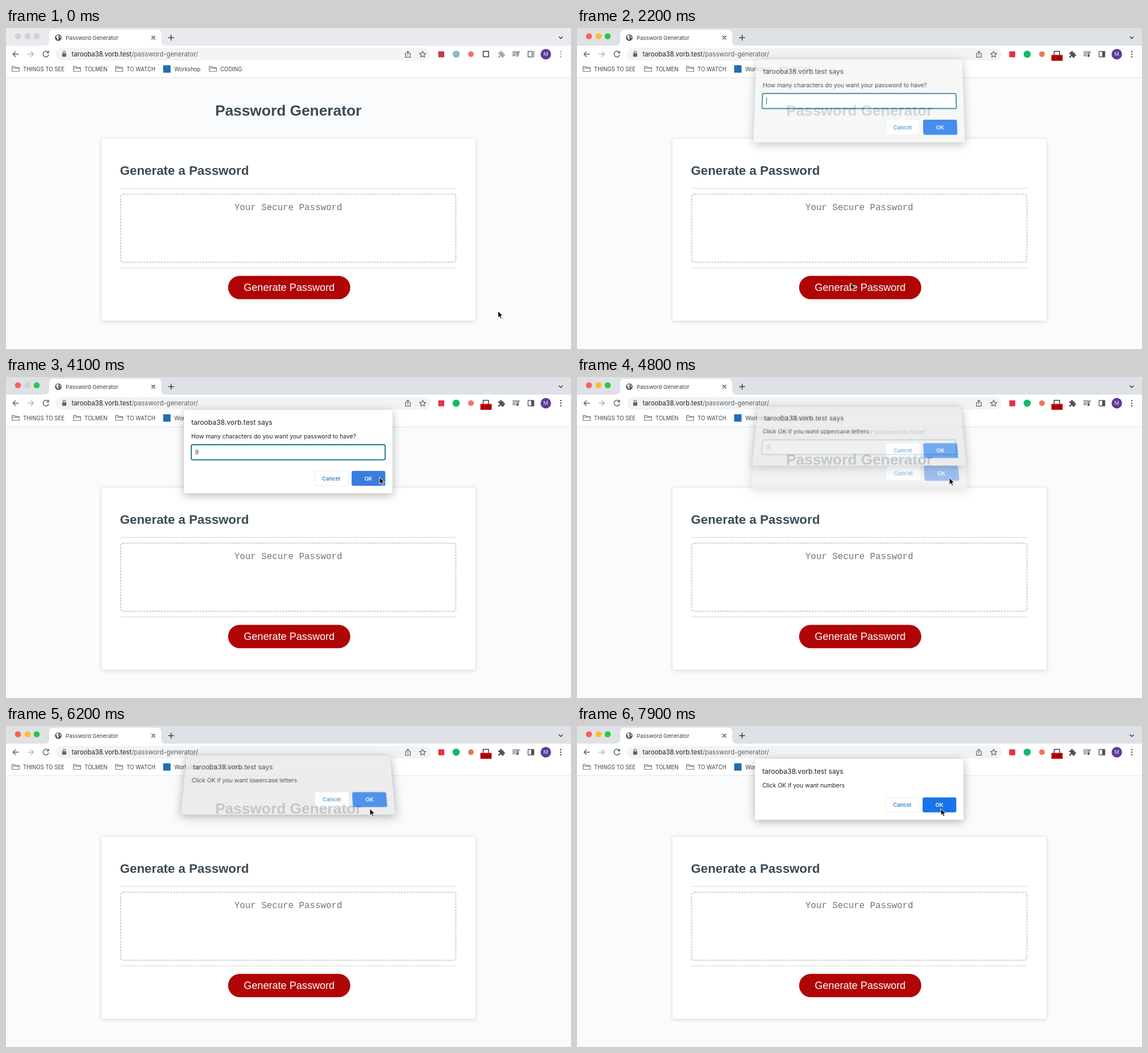
Recreate the animation shown at these times as an HTML page. Size 994 by 564 pixels, loop 8000 ms.

```html
<!DOCTYPE html>
<html lang="en">
<head>
<meta charset="utf-8">
<title>Password Generator</title>
<style>
  html, body { margin: 0; width: 100%; height: 100%; overflow: hidden; background: #fafbfd; }
  svg { position: absolute; left: 0; top: 0; display: block; overflow: visible; }
  text { white-space: pre; }
  .ui { font-family: Inter, Roboto, sans-serif; fill: #3c4043; }
  .page { font-family: "Liberation Sans", Arial, sans-serif; }
  .head { font-weight: 700; fill: #3b4a54; }
  .mono { font-family: "Liberation Mono", monospace; fill: #757575; }
  .line { fill: none; stroke-width: 1.5; stroke-linecap: round; stroke-linejoin: round; }
  .card { filter: drop-shadow(0 1px 3px rgba(0,0,0,.17)); }
  .panel { filter: drop-shadow(0 3px 8px rgba(0,0,0,.3)); }
  .dialog { visibility: hidden; transform-origin: 50% 50%; }
</style>
</head>
<body>
<svg id="stage" width="994" height="564" viewBox="0 0 994 564"></svg>
<div id="dialogs"></div>
<svg id="top" width="994" height="564" viewBox="0 0 994 564">
  <path id="cursor" d="M0 0V12.2L2.8 9.7L4.8 14L6.9 13.1L5 8.9H8.8Z" fill="#111" stroke="#fff" stroke-width="1" stroke-linejoin="round"/>
</svg>
<script>
const LOOP = 8000, STEP = 100;
const HOST = "tarooba38.vorb.test";
const $ = id => document.getElementById(id);

const text = (x, y, size, str, cls = "ui", more = "") =>
  `<text x="${x}" y="${y}" font-size="${size}" class="${cls}" ${more}>${str}</text>`;
const rect = (x, y, w, h, fill, r = 0, more = "") =>
  `<rect x="${x}" y="${y}" width="${w}" height="${h}" rx="${r}" fill="${fill}" ${more}/>`;
const circle = (x, y, r, fill, more = "") =>
  `<circle cx="${x}" cy="${y}" r="${r}" fill="${fill}" ${more}/>`;
const line = (d, more = 'stroke="#5f6368"') => `<path class="line" d="${d}" ${more}/>`;
const middle = 'text-anchor="middle"';

const folder = (x, label) =>
  line(`M${x + .7} 76V67.6H${x + 5}L${x + 6.5} 69.3H${x + 13.3}V76.3H${x + .7}ZM${x + .7} 70.8H${x + 13.3}`,
    'stroke="#6f7377" style="stroke-width:1.1"') + text(x + 20, 75.6, 9.65, label);

function drawStage() {
  const lights = [21, 38, 54].map((x, i) => circle(x, 14.5, 5.3, "#cfd1d4", `id="light${i}"`)).join("");
  const tabStrip =
    rect(0, 0, 994, 31, "#dee1e6", 0, 'id="strip"') + lights +
    `<path d="M68 31Q76 31 76 23V11Q76 3 84 3H265Q273 3 273 11V23Q273 31 281 31Z" fill="#fff"/>` +
    circle(92, 17, 5.8, "#505458") +
    `<path d="M88 14.5L91 12L93 14L91.5 16.5L93 18.5L91 21L89.5 18ZM94 13L96.5 16L95 18Z" fill="#fff"/>` +
    text(105, 20.6, 9.6, "Password Generator") +
    line("M256.5 14.2L262 19.8M262 14.2L256.5 19.8", 'stroke="#3c4043" style="stroke-width:1.3"') +
    line("M286 17H295M290.5 12.5V21.5", 'stroke="#3c4043"') +
    line("M973 15.5L976 18.5L979 15.5", 'stroke="#3c4043"');

  const toolbar =
    rect(0, 31, 994, 56, "#fff") + rect(0, 87, 994, 1, "#dfe1e4") +
    rect(88, 35, 659, 22, "#f1f3f4", 11) +
    line("M22 46H12.5M16.5 41.7L12.2 46L16.5 50.3", 'class="line nav" stroke="#5f6368"') +
    line("M38.5 46H48M44 41.7L48.3 46L44 50.3", 'stroke="#b4b7ba"') +
    line("M74.4 43A5 5 0 1 0 75 47.5M75 40.8V43.8H72", 'class="line nav" stroke="#5f6368"') +
    rect(98.8, 44.5, 7.2, 6, "#5f6368", 1) +
    line("M100.4 44.5V42.8A2 2 0 0 1 104.4 42.8V44.5", 'stroke="#5f6368" style="stroke-width:1.2"') +
    text(115.5, 50, 11.3, `<tspan fill="#202124">${HOST}</tspan><tspan fill="#5f6368">/password-generator/</tspan>`) +
    line("M704.5 44.5H702.8V51.3H711.2V44.5H709.5M707 48V40.8M704.8 42.8L707 40.6L709.2 42.8",
      'stroke="#5f6368" style="stroke-width:1.2"') +
    line("M733 40.7L734.6 44.3L738.5 44.7L735.6 47.3L736.4 51.2L733 49.2L729.6 51.2L730.4 47.3L727.5 44.7L731.4 44.3Z",
      'stroke="#5f6368" style="stroke-width:1.2"') +
    rect(760.5, 41, 10.5, 10.5, "#dc3340", 1, 'id="extA"') +
    circle(792, 46, 6.3, "#15b86a", 'id="extB"') +
    circle(818, 46, 5, "#f2745c") +
    rect(839.5, 41, 9.5, 9.5, "none", 0, 'stroke="#2d3033" stroke-width="1.4"') +
    `<path class="navFill" d="M866 43H869A1.9 1.9 0 1 1 872.5 43H875.5V46A1.8 1.8 0 1 1 875.5 49.4V52H872A1.7 1.7 0 1 0 868.8 52H866V49A1.8 1.8 0 1 0 866 45.8Z"/>` +
    line("M891.5 42.2H900M891.5 45.4H900M891.5 48.6H896M901 48.8V42.2H903.5", 'class="line nav" stroke="#5f6368"') +
    circle(899.7, 49, 1.9, "#5f6368", 'class="navFill"') +
    line("M918.5 41.2H928.5V50.8H918.5Z", 'class="line nav" stroke="#5f6368"') +
    rect(924, 41, 5, 10, "#5f6368", 0, 'class="navFill"') +
    circle(949.7, 46, 9.2, "#5c3a9c") + text(949.7, 49.4, 9.2, "M", "ui", middle + ' style="fill:#ece6f6"') +
    [41.5, 46, 50.5].map(y => circle(976, y, 1.3, "#5f6368", 'class="navFill"')).join("") +
    `<g id="badge">${rect(834.5, 47.3, 20, 10.4, "#c90b0b", 1)}${text(844.6, 55.6, 7.4, "", "ui", middle + ' id="clock" style="fill:#2b0000"')}</g>`;

  const bookmarks =
    folder(10, "THINGS TO SEE") + folder(118, "TOLMEN") + folder(192, "TO WATCH") +
    rect(276.5, 65.5, 13, 13, "#1f6db3") + text(296, 75.6, 9.65, "Workshop") + folder(357, "CODING");

  const page =
    text(496.6, 154.3, 26.32, "Password Generator", "page head", middle) +
    rect(168, 194.5, 658, 320, "#fff", 4, 'class="card"') +
    text(200.5, 258.3, 22.3, "Generate a Password", "page head") +
    rect(201, 281.2, 591, 1.2, "#dcdcdc") + rect(201, 420.9, 591, 1.2, "#dcdcdc") +
    rect(201.8, 292, 589.6, 119.6, "none", 4, 'stroke="#c4c4c4" stroke-width="1.6" stroke-dasharray="3.3 1.9"') +
    text(496.6, 319.6, 15.8, "Your Secure Password", "mono", middle) +
    rect(390.7, 435.5, 215, 41, "#b00505", 20.5) +
    text(498.2, 462.2, 18.1, "Generate Password", "page", middle + ' fill="#fff"');

  $("stage").innerHTML = rect(0, 0, 994, 564, "#fafbfd") + tabStrip + toolbar + bookmarks + page;
}

function makeDialog(message, prompt) {
  const h = prompt ? 146.3 : 106.8, y = prompt ? 165 : 125.5;
  const field = rect(326, 119, 341, 26.5, "#fff", 2.5, 'stroke="#1f7b87" stroke-width="1.9"') +
    text(332.5, 135.8, 10.4, "", "ui", 'id="typed"') + rect(333, 126, 1, 12, "#222", 0, 'id="caret"');
  $("dialogs").insertAdjacentHTML("beforeend",
    `<svg class="dialog" style="left:313px;top:58px" width="367" height="${h}" viewBox="313 58 367 ${h}">` +
    rect(313, 58, 367, h, "#fff", 4, 'class="panel"') +
    text(326, 84.3, 12.15, HOST + " says", "ui", 'style="fill:#202124"') +
    text(326, 108.3, 10.4, message, "ui", 'style="fill:#202124"') + (prompt ? field : "") +
    rect(543, y, 59, 26, "#fff", 3, 'stroke="#e9ebee"') +
    text(572, y + 16.6, 9.6, "Cancel", "ui", middle + ' font-weight="600" style="fill:#3d86cc"') +
    rect(608, y, 59.3, 26.3, "#1a73e8", 3, 'class="ok"') +
    text(637.5, y + 16.6, 9.6, "OK", "ui", middle + ' font-weight="600" style="fill:#fff"') + "</svg>");
  const el = $("dialogs").lastChild;
  return { el, panel: el.querySelector(".panel"), ok: el.querySelector(".ok") };
}

// open: first step of the entrance; close: the next dialog takes over; hover: OK is lit
const dialogs = [
  { ...makeDialog("How many characters do you want your password to have?", true), open: 2100, close: 4800, hover: 4000 },
  { ...makeDialog("Click OK if you want uppercase letters"), open: 4800, close: 6200, hover: 5500 },
  { ...makeDialog("Click OK if you want lowercase letters"), open: 6200, close: 7300, hover: 7100 },
  { ...makeDialog("Click OK if you want numbers"), open: 7300, close: LOOP, hover: LOOP }
];

// tilt in degrees for the swing-in, full size after two steps
function poseDialog(d, t) {
  const leaving = t >= d.close;
  const visible = t >= d.open && t < d.close + STEP;
  d.el.style.visibility = visible ? "visible" : "hidden";
  if (!visible) return;
  const age = (t - d.open) / STEP;
  const swing = leaving || age < 1 ? 1 : age < 2 ? .37 : 0;
  const alpha = leaving ? .48 : age < 1 ? .6 : age < 2 ? .81 : 1;
  const grey = Math.round(255 - 23 * swing);
  d.el.style.opacity = alpha;
  d.el.style.transform = swing
    ? `translateY(${swing < 1 ? -4 : -9}px) perspective(474px) rotateX(${14 * swing}deg)` : "none";
  d.panel.setAttribute("fill", `rgb(${grey},${grey},${grey})`);
  d.ok.setAttribute("fill", t >= d.hover ? "#397de0" : "#1a73e8");
}

// start, end, from, bend, to
const moves = [
  [0, 700, [865.5, 497], [830, 470], [888, 444]],
  [1200, 1700, [888, 444], [700, 506], [481, 448]],
  [2300, 2900, [481, 448], [510, 380], [600, 217]],
  [3500, 4100, [600, 217], [640, 205], [657, 176]],
  [4100, 4300, [657, 176], [656, 177], [655, 177]],
  [5200, 5700, [655, 177], [650, 158], [640, 145]]
];

function cursorAt(t) {
  const [a, b, from, bend, to] = moves.filter(m => t >= m[0]).pop();
  const u = Math.min(1, (t - a) / (b - a)), k = u * u * (3 - 2 * u);
  return from.map((p, i) => (1 - k) * (1 - k) * p + 2 * k * (1 - k) * bend[i] + k * k * to[i]);
}

function render(now) {
  const t = Math.floor((now % LOOP) / STEP) * STEP;
  const active = t >= 1200;
  const ink = active ? "#4d5156" : "#a6a9ad";

  $("strip").setAttribute("fill", active ? "#dee1e6" : "#e8eaee");
  ["#fe5f57", "#febc2e", "#28c840"].forEach((c, i) => {
    const dim = !active || (i === 1 && t >= 3500 && t < 4800);
    $("light" + i).setAttribute("fill", dim ? "#cfd1d4" : c);
  });
  document.querySelectorAll(".nav").forEach(e => e.setAttribute("stroke", ink));
  document.querySelectorAll(".navFill").forEach(e => e.setAttribute("fill", ink));
  $("extA").setAttribute("fill", active ? "#e8323f" : "#c63a4c");
  $("extB").setAttribute("fill", active ? "#15b86a" : "#8fbcc4");

  $("badge").style.display = t >= 900 ? "" : "none";
  $("clock").textContent = t >= 1900 ? "0:0" + Math.floor((t - 1900) / 1000) : "";

  const typed = t >= 3500;
  $("typed").textContent = typed ? "9" : "";
  $("caret").setAttribute("x", typed ? 339.6 : 333);
  $("caret").setAttribute("opacity", t < 2800 || (t >= 3300 && t < 4000) || t >= 4500 ? 1 : 0);

  dialogs.forEach(d => poseDialog(d, t));
  $("cursor").setAttribute("transform", `translate(${cursorAt(t)})`);
}

drawStage();
const start = performance.now();
function tick() {
  render(performance.now() - start);
  requestAnimationFrame(tick);
}
tick();
</script>
</body>
</html>
```
